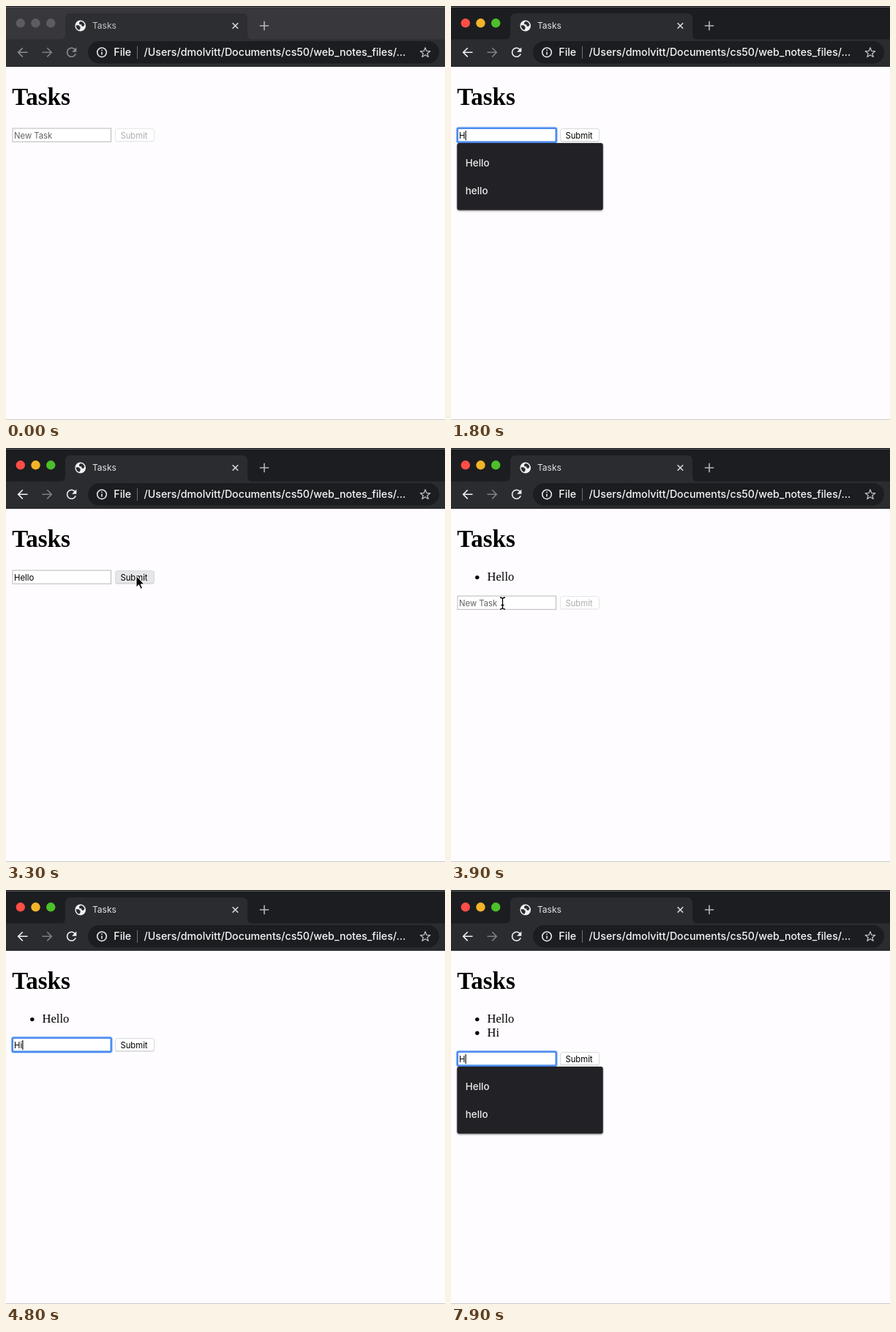
Write an HTML page that moves like this. It is 600 px wide and 565 px high and loops after 8 s.

```html
<!DOCTYPE html>
<html lang="en">
<head>
<meta charset="utf-8">
<title>Tasks</title>
<style>
  html, body { margin: 0; width: 100%; height: 100%; overflow: hidden; background: #fefcff; }
  svg { display: block; width: 600px; height: 565px; }
  text { font-family: Inter, Roboto, sans-serif; white-space: pre; }
  .serif { font-family: "Liberation Serif", serif; }
  .address { font-size: 14.2px; font-weight: 500; fill: #f6f6f8; }
  .field { font-size: 11.3px; }
  .item { font-size: 13.4px; font-weight: 500; fill: #ececee; }
  .line { fill: none; stroke-width: 1.6; }
</style>
</head>
<body>
<svg viewBox="0 0 600 565">
  <defs>
    <filter id="shade" x="-10%" y="-10%" width="120%" height="125%">
      <feDropShadow dx="0" dy="1" stdDeviation="1.3" flood-color="#000" flood-opacity=".5"/>
    </filter>
  </defs>

  <rect width="600" height="565" fill="#fefcff"/>
  <rect y="564" width="600" height="1" fill="#c9c8ca"/>

  <!-- window bar -->
  <rect id="strip" width="600" height="46"/>
  <rect width="600" height="1" fill="#1b1b1d"/>
  <rect y="1" width="600" height="1" fill="#5c5c5f"/>
  <g id="dots"><circle cx="19.8" cy="23.3" r="6.2"/><circle cx="40.5" cy="23.3" r="6.2"/><circle cx="61.2" cy="23.3" r="6.2"/></g>
  <path class="bar" d="M73 46Q81 46 81 38V18Q81 10 89 10H322Q330 10 330 18V38Q330 46 338 46Z"/>
  <rect class="bar" y="45.5" width="600" height="37.5"/>
  <rect y="82" width="600" height="1" fill="#252629"/>

  <!-- globe -->
  <circle cx="101.7" cy="27" r="7.4" fill="#f1f1f2"/>
  <path class="bar" d="M95.6 26.2h3.6l2.4 2.2v2l-1.2 2.4q-4.4-.8-4.8-6.6zM101.4 21.2h2.4q2.8 1.4 3.6 4.4l-1.6 2.4-2.2-.4-.6-2.4h-2.4l-.8-2.2z"/>
  <text id="title" x="118" y="31.2" font-size="12">Tasks</text>
  <path class="line" stroke="#d9dadc" d="M309.6 23.2l7.6 7.6m0-7.6l-7.6 7.6"/>
  <path class="line" stroke="#b4b6b9" d="M346.8 27h12.4M353 20.8v12.4"/>

  <!-- toolbar -->
  <path class="line nav" d="M29.5 63.3H17M22.8 57.2l-6.1 6.1 6.1 6.1"/>
  <path class="line" stroke="#7d7f83" d="M49.5 63.3H62M56.2 57.2l6.1 6.1-6.1 6.1"/>
  <path class="line nav" d="M94.6 60A6 6 0 1 0 95.2 65.2"/>
  <path class="navfill" d="M96.3 56.6v6.2h-6.2z"/>
  <rect x="112" y="48" width="480" height="30.5" rx="15.2" fill="#1c1d20"/>
  <circle class="line" cx="131" cy="63.3" r="6.3" stroke="#e3e4e6"/>
  <path class="line" stroke="#e3e4e6" d="M131 62.4v4.2M131 59.5v1.6"/>
  <text class="address" x="147.3" y="68.4">File</text>
  <rect x="179" y="55" width="1" height="17" fill="#6d6f73"/>
  <text class="address" x="188.6" y="68.4">/Users/dmolvitt/Documents/cs50/web_notes_files/...</text>
  <path id="star" class="line" stroke="#bfc0c3" style="stroke-width:1.3" stroke-linejoin="round"/>

  <!-- page -->
  <text class="serif" x="8.3" y="135" font-size="33" font-weight="bold">Tasks</text>
  <g id="row1"><circle cx="35.8" cy="176.6" r="2.7"/><text class="serif" x="49.6" y="181" font-size="16.5">Hello</text></g>
  <g id="row2"><circle cx="35.8" cy="195.2" r="2.7"/><text class="serif" x="49.6" y="199.7" font-size="16.5">Hi</text></g>

  <g id="form">
    <rect x="9" y="167" width="134.5" height="18.3" fill="#fff" stroke="#b9b9bb"/>
    <g id="ring" fill="none">
      <rect x="8.3" y="166.3" width="136" height="20" rx="2.5" stroke="#a9c9f8" stroke-width="3"/>
      <rect x="8.9" y="166.9" width="134.8" height="18.8" rx="1.5" stroke="#4b8bee" stroke-width="2.4"/>
    </g>
    <text id="entry" class="field" x="11" y="180.7"></text>
    <rect id="caret" y="170" width="1.1" height="13.2"/>
    <rect x="149.4" y="168.6" width="53.2" height="17" rx="3.2" id="edge"/>
    <rect x="149.5" y="167.5" width="53" height="17.2" rx="3" id="button"/>
    <text id="submit" class="field" x="156.4" y="180.7">Submit</text>
    <g id="menu">
      <rect id="panel" x="8.3" y="187" width="199.4" rx="3" fill="#222427" filter="url(#shade)"/>
      <text class="item" x="19.8" y="219.2">Hello</text>
      <text class="item" x="19.8" y="256.7">hello</text>
      <text class="item" x="19.8" y="294.2" id="extra">test</text>
    </g>
  </g>

  <path id="arrow" d="M0 0V15.6L3.6 12.3 6 17.8 8.5 16.7 6.1 11.4H11Z" fill="#000" stroke="#fff" stroke-width="1" stroke-linejoin="round"/>
  <g id="beam" fill="none">
    <path stroke="#fff" stroke-width="2.6" d="M-3.5-8Q0-8 0-5.5V5.5Q0 8-3.5 8M3.5-8Q0-8 0-5.5V5.5Q0 8 3.5 8M-2 2.5H2"/>
    <path stroke="#000" stroke-width="1.3" d="M-3.5-8Q0-8 0-5.5V5.5Q0 8-3.5 8M3.5-8Q0-8 0-5.5V5.5Q0 8 3.5 8M-2 2.5H2"/>
  </g>
</svg>
<script>
const LOOP = 8000, TICK = 100;
const $ = id => document.getElementById(id);
const set = (el, attrs) => { for (const k in attrs) el.setAttribute(k, attrs[k]); };
const setAll = (sel, attrs) => document.querySelectorAll(sel).forEach(el => set(el, attrs));
const show = (id, on) => set($(id), { visibility: on ? 'visible' : 'hidden' });
const within = (t, ...spans) => spans.some(([a, b]) => t >= a && t < b);

// Each edit of the field also restarts the caret blink.
const edits = [
  [700, ''], [1600, 'H'], [2000, 'He'], [2100, 'Hel'], [2200, 'Hell'], [2400, 'Hello'],
  [3400, ''], [4000, ''], [4500, 'H'], [4800, 'Hi'], [5300, ''],
  [6100, 'H'], [6300, 'He'], [6500, 'Hel'], [6700, 'Hell'], [6800, 'Hello'],
  [7300, 'Hell'], [7800, 'He'], [7900, 'H']
];

// Pointer trips: start, arrival, from, to, end of the trip's turn.
const trips = [
  { a: 100, b: 500, from: [0, 138], to: [48, 173], end: 1000 },
  { a: 1000, b: 1200, from: [48, 173], to: [123.5, 150.5], end: 1600 },
  { a: 2800, b: 3100, from: [151, 156], to: [178, 174.5], end: 3400 },
  { a: 3400, b: 3900, from: [178, 174.5], to: [70.5, 212], end: 4500 }
];

function pointer(t) {
  const p = trips.find(p => t >= p.a && t < p.end);
  if (!p) return null;
  const u = Math.min(1, (t - p.a) / (p.b - p.a)), e = u * u * (3 - 2 * u);
  return p.from.map((v, i) => v + (p.to[i] - v) * e);
}

function star(cx, cy) {
  const pts = Array.from({ length: 10 }, (_, i) => {
    const r = i % 2 ? 3 : 7, a = (i / 5 - .5) * Math.PI;
    return (cx + r * Math.cos(a)).toFixed(2) + ' ' + (cy + r * Math.sin(a)).toFixed(2);
  });
  return 'M' + pts.join('L') + 'Z';
}
set($('star'), { d: star(573, 63.8) });

function drawWindow(active) {
  const nav = active ? '#f0f1f2' : '#8b8d91';
  set($('strip'), { fill: active ? '#1c1d20' : '#38373b' });
  setAll('.bar', { fill: active ? '#2b2c30' : '#2d2e32' });
  setAll('.nav', { stroke: nav });
  setAll('.navfill', { fill: nav });
  set($('title'), { fill: active ? '#e4e5e7' : '#c3c4c7' });
  const lights = ['#ff4d47', '#f0b429', '#4cbf2b'];
  [...$('dots').children].forEach((dot, i) => set(dot, { fill: active ? lights[i] : '#5d5c60' }));
}

function drawForm(t, shift) {
  const [last, text] = edits.filter(e => e[0] <= t).pop() || [0, ''];
  const focus = within(t, [700, 3300], [4000, LOOP]);
  const enabled = within(t, [1800, 3400], [4600, 5300], [6200, LOOP]);
  const pressed = within(t, [3300, 3400]);

  set($('form'), { transform: `translate(0 ${shift})` });
  show('ring', focus);
  const entry = $('entry');
  entry.textContent = text || 'New Task';
  set(entry, { fill: text ? '#000' : '#626265' });
  const x = 11.2 + (text ? entry.getComputedTextLength() : 0);
  set($('caret'), { x });
  show('caret', focus && (t - last) % 1000 < 500);

  set($('edge'), { fill: enabled ? '#c4c4c6' : '#ededef' });
  set($('button'), { fill: pressed ? '#e6e6e8' : '#fff', stroke: enabled ? '#d9d9db' : '#e6e5e8' });
  set($('submit'), { fill: enabled ? '#000' : '#adacaf' });

  const long = within(t, [4100, 4500]);
  const open = long || within(t, [1600, 3300], [4500, 4800], [6100, LOOP]);
  set($('menu'), { display: open ? 'inline' : 'none' });
  set($('extra'), { display: long ? 'inline' : 'none' });
  set($('panel'), { height: long ? 129 : 91.5 });
}

function drawPointer(t, shift) {
  const at = pointer(t);
  const inField = at && at[0] < 144 && Math.abs(at[1] - 176.5 - shift) < 10;
  const beam = inField && t >= 800;
  show('arrow', at && !beam);
  show('beam', beam);
  if (at) set($(beam ? 'beam' : 'arrow'), { transform: `translate(${at[0]} ${at[1]})` });
}

function render(ms) {
  const t = Math.floor((ms % LOOP) / TICK) * TICK;
  const rows = t >= 5300 ? 2 : t >= 3400 ? 1 : 0;
  const shift = [0, 35, 54][rows];
  drawWindow(t >= 700);
  show('row1', rows > 0);
  show('row2', rows > 1);
  drawForm(t, shift);
  drawPointer(t, shift);
}

const start = performance.now();
function loop() {
  render(performance.now() - start);
  requestAnimationFrame(loop);
}
loop();
</script>
</body>
</html>
```
